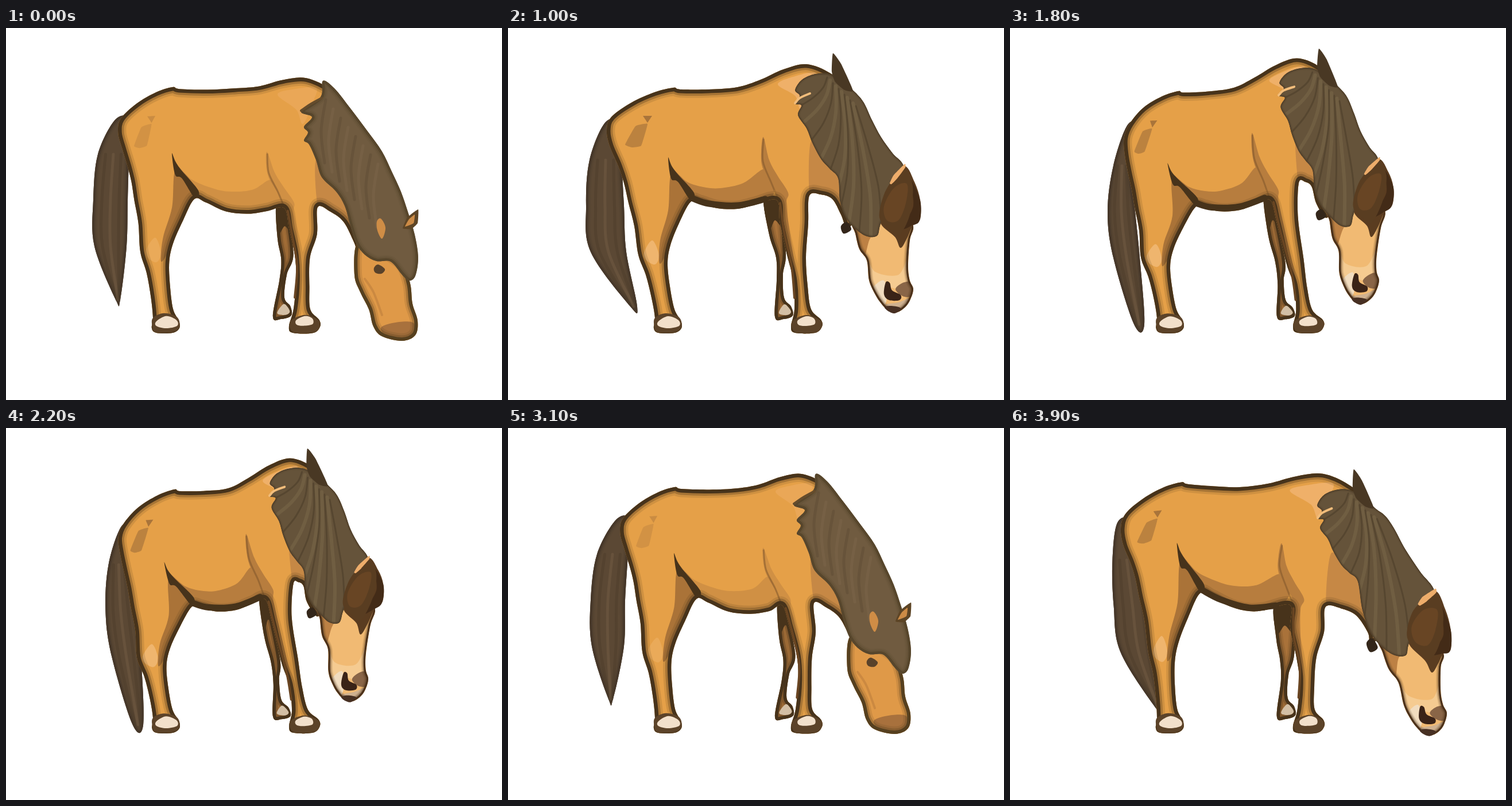
These frames come from a looping animation (864 px wide and 648 px high, 4 s). An HTML page with a canvas:

```html
<!DOCTYPE html>
<html lang="en">
<head>
<meta charset="utf-8">
<title>Grazing horse</title>
<style>
html, body { margin: 0; width: 100%; height: 100%; overflow: hidden; background: #fff; }
canvas { display: block; }
</style>
</head>
<body>
<canvas id="stage" width="864" height="648"></canvas>
<script>
const ctx = document.getElementById('stage').getContext('2d');
const DARK = '#47331b', COAT = '#e5a048', SHADE = '#b77d3e', MANE = '#65533a', PEACH = '#f1ba73';

// Moments in the clip (seconds) at which the poses below hold.
const KEYS = [0, 0.25, 0.5, 0.85, 1.25, 2.05, 2.85, 3.25];
const REST = 4;

// Moves the first `count` points of a pose.
const shift = (pose, dx, dy, count = pose.length / 2) =>
  pose.map((v, i) => i < count * 2 ? v + (i % 2 ? dy : dx) : v);

// Withers, shoulder, elbow, chest, throat; back, croup, rump, haunch, belly, groin,
// thigh, hind knee, fore knee left and right, far leg top and middle, flank, hooves.
const HOOVES = [256, 505, 290, 531, 301, 510, 497, 520, 520, 531, 546, 512, 467, 500];
const bodyGraze = [520, 88, 455, 218, 482, 305, 543, 312, 605, 370, 400, 105, 290, 103, 200, 158, 203, 205, 390, 321,
  328, 298, 292, 222, 235, 390, 505, 400, 531, 400, 474, 315, 478, 400, 238, 190, ...HOOVES];
const bodyReach = [540, 79, 472, 202, 492, 295, 548, 310, 620, 350, 400, 103, 298, 95, 200, 150, 197, 200, 390, 313,
  330, 289, 293, 205, 241, 390, 500, 400, 535, 400, 458, 315, 468, 400, 239, 183, ...HOOVES];
const bodyLift = [517, 64, 445, 192, 470, 290, 525, 292, 578, 320, 400, 103, 288, 104, 180, 155, 177, 200, 370, 314,
  318, 303, 282, 230, 228, 395, 487, 400, 521, 400, 446, 303, 466, 395, 225, 188, ...HOOVES];
const bodyTuck = [497, 54, 422, 185, 450, 292, 503, 270, 530, 300, 390, 104, 293, 110, 209, 166, 201, 215, 370, 319,
  323, 312, 277, 240, 229, 400, 484, 420, 513, 400, 445, 300, 460, 400, 228, 197, ...HOOVES];
const bodyStand = [488, 54, 417, 188, 448, 288, 500, 275, 515, 295, 385, 106, 293, 103, 195, 168, 195, 208, 375, 319,
  323, 310, 280, 235, 229, 400, 480, 410, 508, 400, 444, 297, 460, 400, 230, 193, ...HOOVES];
const bodyPoses = [shift(bodyGraze, -10, -7, 5), bodyGraze, shift(bodyReach, 4, 9, 5), bodyReach,
  bodyLift, bodyTuck, bodyStand, shift(bodyStand, -4, -8, 5)];

// Ear tip and base, mane left, mane low, throat, mane end, poll, nape, cheek, nostril, lip, crest.
const headReach = [596, 70, 630, 137, 535, 155, 603, 265, 627, 381, 683, 392, 738, 280, 764, 375, 686, 485, 757, 490, 728, 531, 666, 172];
const headLift = [566, 45, 600, 110, 502, 132, 575, 262, 588, 352, 640, 362, 691, 240, 718, 325, 632, 445, 706, 452, 674, 495, 634, 160];
const headTuck = [538, 37, 570, 103, 470, 118, 527, 248, 541, 328, 590, 345, 643, 228, 667, 298, 576, 432, 643, 437, 612, 480, 600, 150];
const headStand = [513, 36, 551, 98, 454, 120, 514, 250, 527, 322, 570, 333, 625, 223, 651, 290, 557, 430, 625, 432, 595, 471, 582, 142];
const headPoses = [shift(headReach, -46, 2), shift(headReach, -30, 14), shift(headReach, 9, 18), headReach,
  headLift, headTuck, headStand, shift(headStand, -8, -10)];

// Tail spine: x, y, half width.
const tailPoses = [
  [200, 160, 12, 182, 220, 27, 174, 300, 30, 174, 380, 28, 179, 472, 4],
  [202, 160, 12, 187, 220, 27, 182, 300, 30, 182, 380, 28, 195, 473, 4],
  [204, 163, 14, 199, 230, 26, 203, 310, 31, 207, 390, 29, 232, 483, 5],
  [203, 163, 16, 202, 230, 25, 212, 310, 33, 223, 390, 32, 257, 485, 5],
  [183, 165, 14, 170, 230, 28, 169, 310, 33, 175, 390, 31, 219, 485, 6],
  [214, 170, 10, 195, 240, 15, 194, 320, 24, 203, 400, 23, 225, 516, 9],
  [205, 172, 13, 192, 235, 23, 197, 315, 30, 207, 395, 29, 231, 510, 9],
  [200, 168, 13, 177, 235, 25, 165, 315, 30, 172, 395, 29, 213, 492, 7]
];

// Hermite interpolation through the poses.
function sample(poses, c) {
  let i = 0;
  while (i < KEYS.length - 2 && c > KEYS[i + 1]) i++;
  const span = KEYS[i + 1] - KEYS[i], u = (c - KEYS[i]) / span;
  const slope = (k, n) => k < 1 || k > KEYS.length - 2 ? 0 :
    (poses[k + 1][n] - poses[k - 1][n]) / (KEYS[k + 1] - KEYS[k - 1]) * span;
  const u2 = u * u, u3 = u2 * u;
  return poses[i].map((a, n) => a * (2 * u3 - 3 * u2 + 1) + poses[i + 1][n] * (3 * u2 - 2 * u3) +
    slope(i, n) * (u3 - 2 * u2 + u) + slope(i + 1, n) * (u3 - u2));
}

function invert(matrix) {
  const n = matrix.length;
  const m = matrix.map((row, i) => [...row, ...row.map((_, j) => +(i === j))]);
  for (let k = 0; k < n; k++) {
    let best = k;
    for (let r = k; r < n; r++) if (Math.abs(m[r][k]) > Math.abs(m[best][k])) best = r;
    [m[k], m[best]] = [m[best], m[k]];
    const p = m[k][k];
    m[k] = m[k].map(v => v / p);
    for (let r = 0; r < n; r++) {
      const f = m[r][k];
      if (r !== k && f) m[r] = m[r].map((v, j) => v - f * m[k][j]);
    }
  }
  return m.map(row => row.slice(n));
}

const pairs = flat => Array.from({ length: flat.length / 2 }, (_, i) => [flat[2 * i], flat[2 * i + 1]]);

// Smooth deformation that carries the rest landmarks onto the current pose.
function warper(poses) {
  const rest = pairs(poses[REST]);
  const dist = (a, b) => Math.hypot(a[0] - b[0], a[1] - b[1]);
  const inverse = invert([...rest.map(a => [...rest.map(b => dist(a, b)), 1]), [...rest.map(() => 1), 0]]);
  return c => {
    const moved = pairs(sample(poses, c)).map((p, i) => [p[0] - rest[i][0], p[1] - rest[i][1]]);
    const weights = inverse.map(row => [0, 1].map(k => moved.reduce((s, d, j) => s + row[j] * d[k], 0)));
    return flat => pairs(flat).map(p => {
      const out = [0, 1].map(k => p[k] + weights[rest.length][k]);
      rest.forEach((q, i) => {
        const r = dist(p, q);
        out[0] += weights[i][0] * r;
        out[1] += weights[i][1] * r;
      });
      return out;
    });
  };
}
const bodyWarp = warper(bodyPoses), headWarp = warper(headPoses);

// Curve through the points; bend 0 gives straight sides.
function curve(pts, closed = true, bend = 1 / 6) {
  const path = new Path2D(), n = pts.length;
  const at = i => closed ? pts[(i + n) % n] : pts[Math.max(0, Math.min(n - 1, i))];
  path.moveTo(...pts[0]);
  for (let i = 0; i < (closed ? n : n - 1); i++) {
    const [a, b, c, d] = [at(i - 1), at(i), at(i + 1), at(i + 2)];
    path.bezierCurveTo(b[0] + (c[0] - a[0]) * bend, b[1] + (c[1] - a[1]) * bend,
      c[0] - (d[0] - b[0]) * bend, c[1] - (d[1] - b[1]) * bend, c[0], c[1]);
  }
  if (closed) path.closePath();
  return path;
}

function fill(path, color) { ctx.fillStyle = color; ctx.fill(path); }
function line(path, color, width) {
  ctx.strokeStyle = color;
  ctx.lineWidth = width;
  ctx.stroke(path);
}
function faded(alpha, draw) {
  ctx.save();
  ctx.globalAlpha *= alpha;
  draw();
  ctx.restore();
}
// Soft dark rim inside a shape.
function rim(path, color, width) {
  ctx.save();
  ctx.clip(path);
  [[2.2, 0.14], [1.6, 0.3], [1, 1]].forEach(([k, alpha]) => faded(alpha, () => line(path, color, width * k)));
  ctx.restore();
}

function drawTail(c) {
  const flat = sample(tailPoses, c), left = [], right = [];
  for (let i = 0; i < flat.length; i += 3) {
    const [x, y, w] = flat.slice(i, i + 3);
    left.push([x - w, y]);
    right.unshift([x + w, y]);
  }
  const shape = curve([...left, ...right]);
  fill(shape, '#5b4834');
  rim(shape, '#47382a', 8);
  [0.25, 0.5, 0.75].forEach((k, i) => {
    const strand = left.map((p, j) => [p[0] + (right[4 - j][0] - p[0]) * k, p[1]]);
    faded(0.4, () => line(curve(strand.slice(1), false), i === 1 ? '#78634a' : '#493a2a', 5));
  });
}

const BODY = [560, 78, 520, 63, 480, 72, 440, 90, 400, 103, 350, 107, 300, 107, 288, 104, 255, 112, 215, 130, 180, 155,
  172, 178, 177, 205, 192, 240, 202, 270, 210, 305, 220, 345, 227, 395, 240, 430, 250, 470, 256, 505, 254, 523, 262, 531,
  290, 531, 302, 523, 301, 510, 290, 490, 282, 450, 278, 410, 283, 378, 298, 340, 318, 303, 335, 305, 365, 314, 400, 315,
  430, 308, 468, 300, 474, 340, 486, 395, 497, 440, 499, 490, 493, 520, 500, 531, 535, 531, 547, 520, 545, 508, 528, 490,
  522, 450, 519, 400, 523, 340, 525, 292, 545, 290, 565, 298, 580, 325, 590, 347, 604, 330, 605, 260, 600, 180, 578, 100];
const FAR_LEG = [446, 296, 455, 360, 467, 400, 468, 440, 465, 503, 480, 507, 496, 501, 493, 485, 481, 470, 479, 430, 484, 390, 474, 296];

function drawBody(c, crisp) {
  const warp = bodyWarp(c);
  const patch = (flat, color, bend) => fill(curve(warp(flat), true, bend), color);

  const farLeg = curve(warp(FAR_LEG));
  fill(farLeg, '#a9723a');
  rim(farLeg, DARK, 11);
  patch([446, 298, 476, 298, 478, 345, 465, 335, 455, 350], DARK);
  patch([472, 497, 478, 484, 484, 482, 493, 494, 486, 500], '#d3bfa5');

  const body = curve(warp(BODY));
  fill(body, COAT);
  ctx.save();
  ctx.clip(body);
  patch([527, 200, 550, 220, 585, 250, 600, 350, 577, 330, 545, 292, 526, 297], '#c68845');
  faded(0.45 + 0.55 * crisp, () => {
    patch([289, 248, 312, 268, 340, 277, 370, 279, 410, 270, 445, 246, 456, 264, 464, 284, 450, 300, 400, 306, 350, 304, 315, 292], SHADE);
    patch([445, 190, 441, 215, 443, 242, 457, 270, 469, 292, 470, 325, 482, 380, 503, 440, 490, 350, 485, 305, 488, 287, 470, 258, 455, 230], SHADE);
    patch([204, 203, 222, 171, 243, 167, 232, 205, 216, 208], '#bb823f', 0.05);
    patch([235, 153, 251, 153, 243, 165], '#a9743a', 0);
    patch([236, 397, 251, 370, 263, 396, 255, 412], '#efb56e');
    patch([470, 98, 500, 84, 535, 78, 530, 100, 510, 140, 500, 118], '#efb069');
  });
  patch([286, 252, 322, 292, 296, 342, 276, 392, 264, 410, 265, 370, 279, 318], '#aa7338');
  ctx.restore();

  ctx.lineCap = 'round';
  faded(crisp, () => line(curve(warp([322, 297, 350, 306, 400, 309, 448, 298]), false), DARK, 11));
  patch([279, 226, 285, 240, 296, 255, 324, 287, 318, 300, 296, 268, 284, 262], DARK);
  faded(0.5, () => line(curve(warp([445, 194, 444, 232, 458, 268, 469, 294]), false), '#7b5228', 3));
  rim(body, DARK, 13);
  line(curve(warp([474, 305, 481, 355, 494, 415, 499, 470]), false), '#694522', 4);

  patch([256, 505, 275, 497, 298, 504, 302, 521, 289, 530, 261, 530, 255, 520], '#5c4329');
  patch([262, 511, 279, 502, 297, 509, 298, 519, 279, 523, 262, 519], '#f2e0cb');
  patch([495, 511, 520, 500, 544, 509, 546, 521, 535, 530, 501, 530], '#5c4329');
  patch([505, 509, 520, 502, 533, 506, 534, 516, 518, 519, 506, 517], '#f2e0cb');
}

const MANE_SHAPE = [500, 108, 512, 90, 535, 80, 560, 80, 585, 95, 605, 112, 620, 130, 634, 160, 650, 190, 670, 218, 690, 242,
  690, 290, 655, 330, 648, 345, 643, 362, 625, 363, 605, 350, 588, 330, 578, 300, 575, 262, 560, 245, 545, 228, 530, 200,
  520, 175, 505, 152, 511, 135, 500, 132, 508, 118];
const FACE = [600, 335, 605, 358, 612, 385, 625, 405, 629, 440, 640, 465, 650, 480, 660, 490, 675, 496, 690, 488, 700, 475,
  706, 455, 700, 440, 697, 415, 700, 370, 706, 345, 690, 320, 640, 320];

function drawHead(c) {
  const warp = headWarp(c);
  const patch = (flat, color, bend) => fill(curve(warp(flat), true, bend), color);

  patch([580, 345, 590, 338, 598, 350, 590, 357, 583, 357], '#33261a');
  const face = curve(warp(FACE));
  fill(face, PEACH);
  ctx.save();
  ctx.clip(face);
  patch([600, 335, 645, 345, 630, 368, 622, 395, 612, 400], '#bd8144');
  patch([625, 400, 640, 425, 680, 430, 698, 400, 702, 455, 660, 452, 638, 470, 625, 440], '#f5cb91');
  patch([636, 452, 655, 440, 660, 470, 652, 486, 638, 470], '#f1dcbf');
  patch([675, 455, 690, 443, 707, 444, 708, 465, 690, 468], '#896547');
  patch([650, 484, 680, 478, 700, 472, 690, 500, 660, 500], '#cfb190');
  rim(face, '#4c321b', 7);
  ctx.restore();
  patch([655, 464, 658, 443, 665, 444, 669, 457, 684, 465, 682, 474, 664, 474], '#3a2317');
  patch([656, 486, 668, 484, 684, 488, 674, 497, 662, 493], '#473023');

  patch([690, 240, 708, 268, 718, 300, 718, 333, 705, 344, 696, 364, 684, 383, 674, 364, 650, 342, 642, 310, 660, 265], '#5a3c20');
  patch([700, 262, 718, 300, 717, 335, 704, 344, 685, 349, 706, 310], '#432b17');

  const mane = curve(warp(MANE_SHAPE));
  ctx.save();
  ctx.clip(mane);
  fill(mane, MANE);
  const ends = [505, 138, 514, 165, 528, 196, 545, 228, 562, 246, 576, 275, 580, 312, 594, 338, 612, 354, 632, 362, 650, 335];
  pairs(ends).forEach(([x, y], i) => {
    const sx = 556 + i * 5, sy = 86 + i * 5;
    const strand = [sx, sy, sx + (x - sx) * 0.3 + 8, sy + (y - sy) * 0.35, sx + (x - sx) * 0.68 + 9, sy + (y - sy) * 0.7, x, y];
    faded(0.5, () => line(curve(warp(strand), false), i % 2 ? '#7c6a4b' : '#493a27', i % 2 ? 6 : 3));
  });
  rim(mane, '#53422c', 4);
  ctx.restore();
  patch([647, 330, 655, 290, 672, 262, 690, 244, 705, 275, 700, 325, 682, 360, 665, 350], '#593d21');
  patch([655, 310, 673, 278, 695, 272, 693, 305, 680, 335, 660, 335], '#684524');

  line(curve(warp([500, 131, 508, 122, 526, 114]), false), '#f2bd7b', 4);
  patch([566, 44, 580, 62, 601, 109, 586, 108, 570, 94, 564, 76], '#493824', 0.08);
  patch([665, 270, 672, 256, 691, 237, 692, 243, 678, 262, 668, 272], '#eead6b', 0.08);
}

const SOFT_MANE = [552, 92, 572, 105, 600, 140, 630, 180, 655, 215, 672, 250, 688, 285, 700, 320, 712, 360, 718, 400, 713, 432,
  702, 440, 690, 430, 670, 407, 645, 406, 625, 395, 610, 375, 600, 345, 590, 310, 575, 285, 550, 260, 540, 230, 528, 203,
  519, 196, 526, 182, 519, 172, 533, 155, 514, 145, 548, 120];
const SOFT_FACE = [612, 375, 607, 430, 617, 460, 632, 490, 640, 520, 655, 537, 690, 545, 713, 535, 717, 510, 708, 480, 704, 445, 690, 410, 650, 385];

// Softer head with drawn eye and two small ears, seen while grazing.
function drawSoftHead(c) {
  const patch = (flat, color, bend) => fill(curve(pairs(flat), true, bend), color);
  const [dx, dy] = c < 0.25 ? [64 * (c - 0.25), 48 * (c - 0.25)] : [120 * (c - 0.25), 28 * (c - 0.25)];
  ctx.save();
  ctx.translate(dx, dy);
  const face = curve(pairs(SOFT_FACE));
  fill(face, '#df9948');
  patch([655, 520, 685, 512, 710, 514, 708, 534, 680, 540, 658, 532], '#a8713d');
  rim(face, '#56401f', 12);
  faded(0.5, () => line(curve(pairs([625, 437, 640, 460, 655, 500]), false), '#b77b3b', 4));
  const mane = curve(pairs(SOFT_MANE));
  fill(mane, '#705b40');
  ctx.save();
  ctx.clip(mane);
  for (let i = 0; i < 8; i++) {
    const x = 535 + i * 13, y = 150 + i * 16;
    faded(0.35, () => line(curve(pairs([x + 22, y - 25, x + 14, y + 30, x + 20, y + 85]), false), i % 2 ? '#806b4e' : '#58472f', 5));
  }
  rim(mane, '#57462c', 9);
  ctx.restore();
  line(curve(pairs([514, 144, 530, 133, 550, 122]), false), '#654c2c', 4);
  patch([641, 418, 648, 412, 660, 420, 654, 428, 643, 426], '#59422a');
  patch([653, 332, 661, 348, 655, 367, 647, 353, 646, 337], '#cf8d46');
  patch([691, 349, 699, 330, 718, 316, 717, 340, 706, 350], '#5d4526', 0.06);
  patch([695, 346, 702, 333, 712, 325, 710, 340], '#cc8b46', 0.06);
  ctx.restore();
}

function render() {
  const ms = Math.floor(performance.now() % 4000 / 100) * 100;
  const c = ms < 3100 ? ms / 1000 + 0.25 : (ms - 3100) / 1000;
  const k = Math.max(0, Math.min(1, (c - 0.28) / 0.2));
  const crisp = k * k * (3 - 2 * k);
  ctx.fillStyle = '#fff';
  ctx.fillRect(0, 0, 864, 648);
  drawTail(c);
  drawBody(c, crisp);
  if (crisp < 1) faded(1 - crisp, () => drawSoftHead(c));
  if (crisp > 0) faded(crisp, () => drawHead(c));
  requestAnimationFrame(render);
}
ctx.lineJoin = 'round';
render();
</script>
</body>
</html>
```
